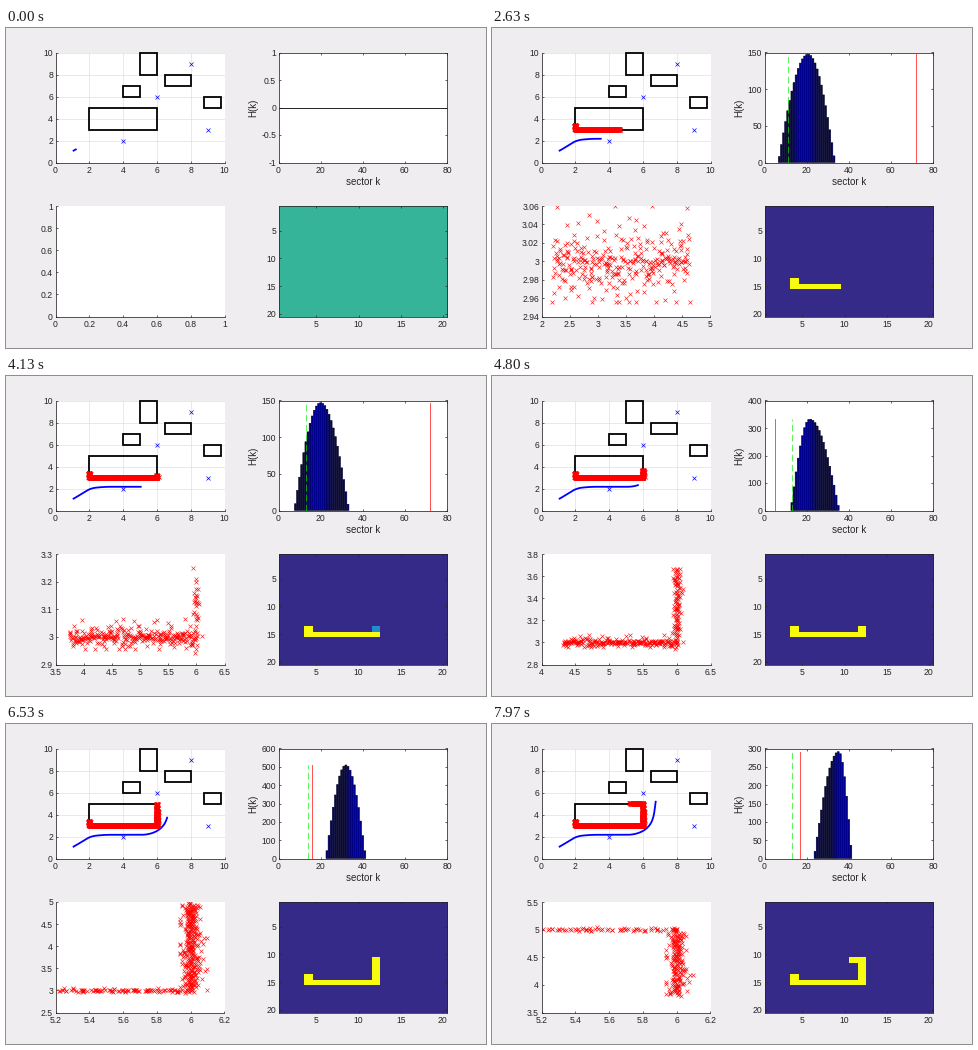
A matplotlib script that plays this animation: 480x320 px, repeating every 8 s.

```python
import math
import numpy as np
import matplotlib as mpl
import matplotlib.pyplot as plt
from matplotlib.animation import FuncAnimation
from matplotlib.patches import Rectangle

W, H, DPI = 480, 320, 100
FRAMES, INTERVAL = 200, 40
PX = 72 / DPI
INK = "#262626"
NAVY, YELLOW, CYAN, TEAL = [
    np.array(c) / 255 for c in ((53, 42, 135), (249, 251, 14), (33, 140, 210), (53, 180, 154))]

mpl.rcParams.update({
    "font.family": "Liberation Sans", "font.size": 6.2,
    "axes.linewidth": 0.55, "axes.edgecolor": INK,
    "text.color": INK, "axes.labelcolor": INK,
    "xtick.color": INK, "ytick.color": INK,
    "xtick.direction": "in", "ytick.direction": "in",
    "xtick.major.size": 1.4, "ytick.major.size": 1.4,
    "xtick.major.width": 0.5, "ytick.major.width": 0.5,
    "xtick.major.pad": 2.6, "ytick.major.pad": 1.8,
})

# ---- robot: constant speed, piecewise linear heading in degrees ----
SPEED, START, GOAL = 1.01, (1.2, 1.19), (8.5, 9)
TURNS = ((0, 43), (0.9, 43), (1.5, 10), (2.4, 0), (4.15, 0), (5.5, 55), (6.2, 75), (7, 85))
DT = INTERVAL / 1000
TIMES = np.arange(FRAMES) * DT
HEADING = np.interp(TIMES, *zip(*TURNS))
rad = np.radians(np.interp(TIMES[:-1] + DT / 2, *zip(*TURNS)))
moves = SPEED * DT * np.column_stack((np.cos(rad), np.sin(rad)))
PATH = np.vstack((START, START + np.cumsum(moves, axis=0)))

# ---- range readings scattered along the walls ----
rng = np.random.default_rng(7)
REACH, KEEP = 1.42, 1.56


def wall(start, end, density, sigma):
    start, end = np.array(start, float), np.array(end, float)
    n = int(np.hypot(*(end - start)) * density)
    along = (np.arange(n) + rng.random(n)) / n
    base = start + along[:, None] * (end - start)
    noise = np.clip(rng.laplace(0, 0.75 * sigma, (n, 2)), -2.2 * sigma, 3.2 * sigma)
    return base, base + noise


WALLS = [wall((2, 3), (6, 3), 130, 0.02), wall((2, 3), (2, 3.48), 120, 0.03),
         wall((6, 3), (6, 5), 150, 0.03), wall((5.22, 5), (6, 5), 85, 0.02)]
BASE, HITS = (np.vstack(part) for part in zip(*WALLS))
DIST = np.hypot(PATH[:, None, 0] - HITS[:, 0], PATH[:, None, 1] - HITS[:, 1])
# the upper wall comes into sight only from above it
from_above = (BASE[:, 1] == 5) & (PATH[:, None, 1] > 5)
in_reach = np.where(BASE[:, 1] == 5, from_above & (DIST < KEEP), DIST < REACH)
SEEN = np.logical_or.accumulate(in_reach, axis=0)
RECENT = SEEN & (DIST < KEEP)
FIRST = int(np.argmax(SEEN.any(axis=1)))

# ---- certainty grid: share of each cell's readings seen so far ----
col = np.ceil((BASE[:, 0] - 0.1) / 0.5).astype(int) - 1
row = 20 - np.ceil(BASE[:, 1] / 0.5).astype(int)
CELL = row * 20 + col
TOTAL = np.maximum(np.bincount(CELL, minlength=400), 1)


def grid_image(i):
    share = (np.bincount(CELL[SEEN[i]], minlength=400) / TOTAL).reshape(20, 20, 1)
    empty = NAVY if i >= FIRST else TEAL
    return np.where(share > 0.65, YELLOW, np.where(share > 0.38, CYAN, empty))


# ---- polar histogram: time, first sector, last sector, peak, peak position ----
HUMPS = np.array([
    (0.6, 14, 18, 25, 0.5), (1.5, 8, 26, 169, 0.72), (2.63, 7, 33, 147, 0.52),
    (4.13, 8, 33, 147, 0.48), (5.5, 19, 37, 525, 0.3), (6.53, 23, 41, 510, 0.5),
    (7.97, 24, 41, 290, 0.65)])
SECTORS = np.arange(1, 73)


def histogram(t):
    first, last, peak, top = (np.interp(t, HUMPS[:, 0], c) for c in HUMPS.T[1:])
    first, last = round(first), round(last)
    u = (SECTORS - first + 0.5) / (last - first + 1)
    phase = np.interp(u, (0, top, 1), (0, 0.5, 1))
    h = np.sin(np.pi * phase)
    h[(u < 0) | (u > 1)] = 0
    return peak * h / h.max()


# ---- axes ----
def nice_ticks(lo, hi):
    for e in range(-3, 4):
        for m in (1, 2, 5):
            step = m * 10.0 ** e
            a, b = math.floor(lo / step + 1e-6), math.ceil(hi / step - 1e-6)
            if b - a <= 6:
                return np.arange(a, max(b, a + 1) + 1) * step
    return np.array((lo, hi))


def scale(axis, ticks):
    setter = axis.axes.set_xlim if axis.axis_name == "x" else axis.axes.set_ylim
    setter(ticks[0], ticks[-1])
    axis.set_ticks(ticks, [f"{round(v, 4) + 0:g}" for v in ticks])


fig = plt.figure(figsize=(W / DPI, H / DPI), dpi=DPI, facecolor="#efedef")


def panel(x, y, w, h, box):
    ax = fig.add_axes((x / W, 1 - (y + h) / H, w / W, h / H))
    ax.spines[["top", "right"]].set_visible(box)
    ax.tick_params(top=box, right=box)
    return ax


world = panel(49.5, 24.5, 169, 110, False)
polar = panel(272.5, 24.5, 168.5, 110, True)
local = panel(49.5, 178, 169, 110.5, False)
cells = panel(272.5, 178, 168.5, 110.5, True)

for axis in (world.xaxis, world.yaxis):
    scale(axis, np.arange(0, 11, 2))
world.grid(color="#e0e0e0", lw=0.5)
world.set_axisbelow(True)
for x, y, w, h in ((2, 3, 4, 2), (4, 6, 1, 1), (5, 8, 1, 2), (6.5, 7, 1.5, 1), (8.8, 5, 1, 1)):
    world.add_patch(Rectangle((x, y), w, h, fill=False, ec="black", lw=1.8 * PX,
                              zorder=2, clip_on=False))
world.plot((4, 9, 6, 8), (2, 3, 6, 9), "x", color="blue", ms=4 * PX, mew=0.5, zorder=2)
trail, = world.plot([], [], color="blue", lw=1.8 * PX, zorder=3)
world_hits, = world.plot([], [], "x", color="red", ms=4.6 * PX, mew=0.6, zorder=4)

scale(polar.xaxis, np.arange(0, 81, 20))
polar.set_xlabel("sector k", fontsize=7, labelpad=1.5)
polar.text(247.5 / W, 1 - 80 / H, "H(k)", fontsize=7, rotation=90,
           ha="center", va="center", transform=fig.transFigure)
polar.axhline(0, color="black", lw=0.6)
bars = polar.bar(SECTORS, 0 * SECTORS, 0.9, fc="#00008f", ec="black", lw=0.35, snap=False)
steer, = polar.plot([], [], color="red", lw=0.6, alpha=0.8)
aim, = polar.plot([], [], color="#00f000", lw=0.6, alpha=0.75, dashes=(8, 4))

local_hits, = local.plot([], [], "x", color="red", ms=4.2 * PX, mew=0.45, alpha=0.9)

image = cells.imshow(grid_image(0), aspect="auto", interpolation="nearest",
                     extent=(0.5, 20.5, 20.5, 0.5))
cells.set_xticks((5, 10, 15, 20))
cells.set_yticks((5, 10, 15, 20))


def update(i):
    active = i >= FIRST
    trail.set_data(np.r_[1.07, PATH[:i + 1, 0]], np.r_[1.08, PATH[:i + 1, 1]])
    world_hits.set_data(*HITS[SEEN[i]].T)
    image.set_data(grid_image(i))

    near = HITS[RECENT[i]]
    local_hits.set_data(*near.T)
    for axis, vals in zip((local.xaxis, local.yaxis), near.T):
        if active:
            scale(axis, nice_ticks(vals.min(), vals.max()))
        else:
            scale(axis, np.linspace(0, 1, 6))

    heights = histogram(TIMES[i]) * active
    for bar, h in zip(bars, heights):
        bar.set_height(h)
        bar.set_visible(h > 0)

    peak = heights.max()
    scale(polar.yaxis, nice_ticks(0, peak) if active else np.linspace(-1, 1, 5))
    dx, dy = GOAL - PATH[i]
    for line, angle in ((steer, HEADING[i]), (aim, math.degrees(math.atan2(dy, dx)))):
        sector = round(angle / 5) or 72
        line.set_data((sector, sector), (0, peak))
        line.set_visible(active)
    return ()


anim = FuncAnimation(fig, update, frames=FRAMES, interval=INTERVAL,
                     init_func=lambda: update(0), repeat=True, repeat_delay=0, blit=False)
plt.show()
```
